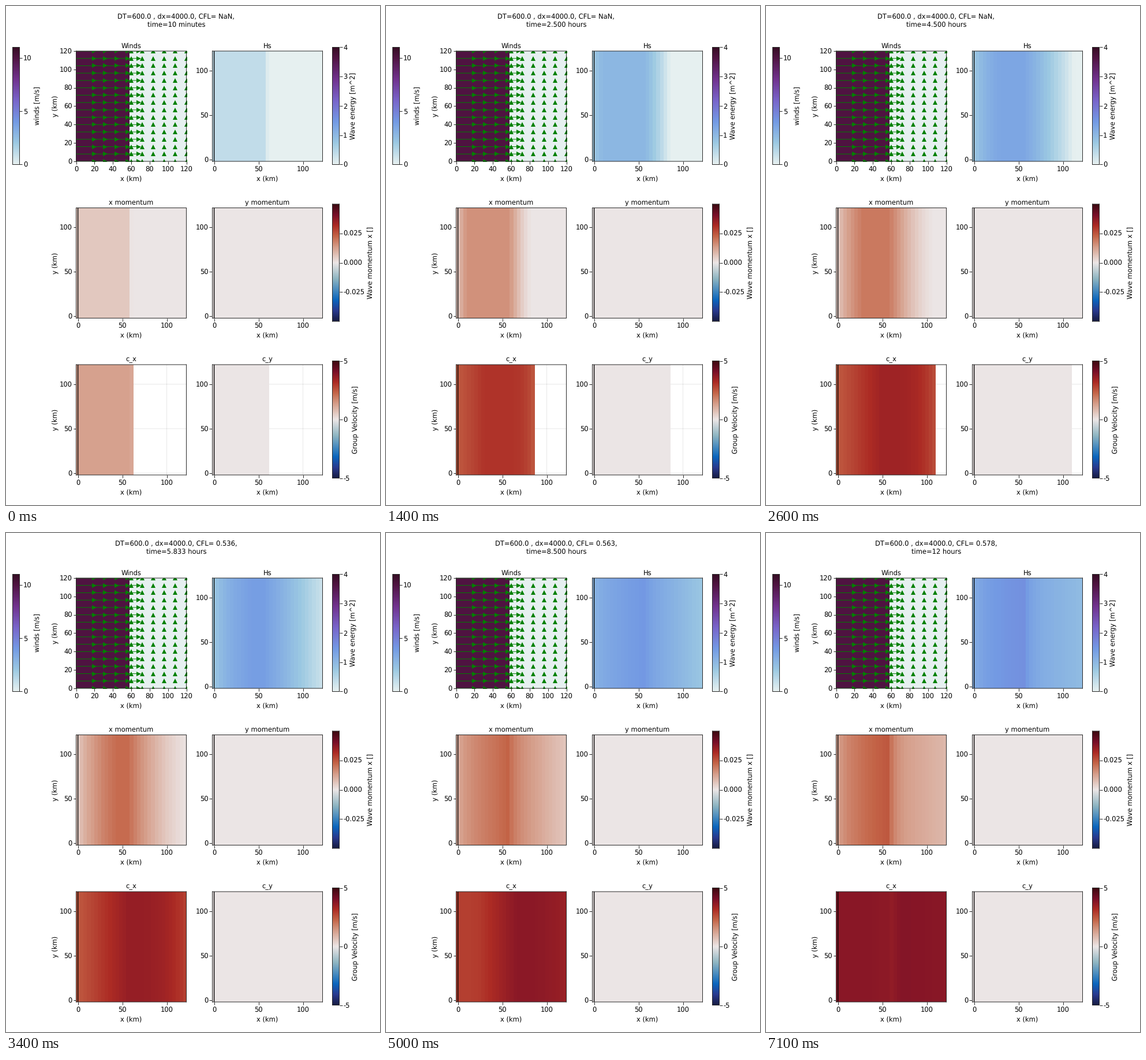
A matplotlib script for the animation above (7200 ms loop, 648 by 864 pixels).

```python
import numpy as np
import matplotlib.pyplot as plt
from matplotlib.animation import FuncAnimation
from matplotlib.colors import LinearSegmentedColormap

W, H, DPI = 648, 864, 72          # at 72 dpi one point is one pixel
FRAMES, INTERVAL = 72, 100
INK = "#2a2a2a"
plt.rcParams.update({
    "font.family": "DejaVu Sans", "font.size": 11.55, "text.hinting": "none",
    "axes.linewidth": 1.0, "axes.edgecolor": INK, "path.snap": False,
})


def make_cmap(name, places, colors):
    stops = [(p / 11, "#" + c) for p, c in zip(places, colors.split())]
    return LinearSegmentedColormap.from_list(name, stops, N=512)


dense = make_cmap("dense", [0, 2, 4, 6, 8, 10, 11],
                  "e6f0f0 9cc9e2 739ae4 7864ca 71328d 501442 360e24")
balance = make_cmap("balance", [0, 1, 2, 4, 5.5, 7, 8, 9, 10, 11],
                    "171c42 293a8f 0b66bd 8eb5c2 ece6e6 "
                    "d59d89 c46548 ac2b24 780e28 3c0911")

X = np.arange(0, 121, 4.0)        # cell centres in km
SPAN = 124                        # the domain is periodic over this length
EDGE = 56                         # last cell under the wind


def swell(x, step):
    """Share of the wave height left after running out of the wind."""
    away = np.maximum(x - EDGE, 0)
    reach = 61 + 1.5 * step + 0.0185 * step ** 2
    u = np.clip(away / (reach - EDGE), 0, 1)
    loss = 0.25 * (step / FRAMES) ** 2
    return (1 - u ** 1.3) * (1 - loss * (1 - np.exp(-away / 8)))


def wave_height(step):
    """Growth limited by time and by fetch, plus swell that wraps around."""
    peak = min(0.36 * (step + 1) ** 0.38, 1.6)
    fetch = 0.537 * (np.minimum(X, EDGE) + 2) ** 0.25
    wrapped = peak * swell(X + SPAN, step)
    windy = np.minimum(np.hypot(fetch, wrapped), peak)
    top = windy[X == EDGE][0]
    return np.where(X <= EDGE, windy, top * swell(X, step)), top


def top_speed(step):
    n = step + 1
    return 3.912 - 1.786 * np.exp(-0.0475 * n) - 1.8 * np.exp(-n / 1.5)


def group_speed(step):
    top = top_speed(step)
    front = 62 + 1.86 * step
    v = np.clip((X - EDGE) / (front - EDGE), 0, 1)
    local = np.minimum(2.45 + 0.02 * X, top * (1 - 0.25 * v ** 3))
    mix = np.clip((step - 44) / 18 - X / 75, 0, 1)
    mix = np.where(X <= EDGE, mix, 0)
    return local + mix * np.maximum(0.98 * top - local, 0)


def elapsed(step):
    minutes = 10 * (step + 1)
    if minutes < 60:
        return f"{minutes} minutes"
    if minutes == 60:
        return "1 hour"
    if minutes % 60 == 0:
        return f"{minutes // 60} hours"
    return f"{minutes / 60:.3f} hours"


fig = plt.figure(figsize=(W / DPI, H / DPI), dpi=DPI, facecolor="white")


def label(x, y, text, **kw):
    """Text centred at a pixel position measured from the top left."""
    kw = {"ha": "center", "va": "baseline", **kw}
    return fig.text(x / W, 1 - y / H, text, **kw)


def side_label(x, y, text):
    label(x, y, text, rotation=90, va="center")


def box(left, top, width, height):
    ax = fig.add_axes([left / W, 1 - (top + height) / H, width / W, height / H])
    ax.tick_params(length=5, width=1, color=INK)
    ax.tick_params(axis="x", pad=3.5)
    ax.tick_params(axis="y", pad=1.5)
    return ax


SIDE = 191


def panel(left, top, title, cmap, vmin, vmax, wind=False):
    ax = box(left, top, SIDE, SIDE)
    lo, hi = (0, 120) if wind else (-2, 122)
    img = ax.imshow(np.zeros((1, X.size)), cmap=cmap, vmin=vmin, vmax=vmax,
                    extent=(-2, 122, -2, 122), aspect="auto",
                    interpolation="nearest", zorder=1)
    ax.set(xlim=(lo, hi), ylim=(lo, hi))
    ticks = range(0, 121, 20 if wind else 50)
    ax.set_xticks(ticks)
    ax.set_yticks(ticks)
    ax.set_axisbelow(True)
    ax.grid(color="black", alpha=0.12, lw=0.8)
    if not wind:
        ax.axvline(0, color="black", lw=1.4, zorder=2)
    mid, bottom = left + SIDE / 2, top + SIDE
    label(mid, top - 5.5, title)
    label(mid, bottom + 33, "x (km)")
    if left < 200:
        side_label(85, top + SIDE / 2, "y (km)")
    return ax, img


def color_bar(left, top, cmap, lo, hi, ticks, form, title, title_x):
    ax = box(left, top, 12, 203)
    ax.imshow(np.linspace(0, 1, 256)[:, None], cmap=cmap, origin="lower",
              extent=(0, 1, lo, hi), aspect="auto")
    ax.set_xticks([])
    ax.yaxis.tick_right()
    ax.set_yticks(ticks, [format(t, form) for t in ticks])
    side_label(title_x, top + 101.5, title)


C1, C2 = 121.5, 357.5
R1, R2, R3 = 78, 349.5, 621
B1, B2, BAR_UP = 11.5, 565.5, 6.5
wind_ax, wind_img = panel(C1, R1, "Winds", dense, 0, 11, wind=True)
_, height_img = panel(C2, R1, "Hs", dense, 0, 4)
_, mx_img = panel(C1, R2, "x momentum", balance, -0.05, 0.05)
panel(C2, R2, "y momentum", balance, -0.05, 0.05)
_, cx_img = panel(C1, R3, "c_x", balance, -5, 5)
_, cy_img = panel(C2, R3, "c_y", balance, -5, 5)

color_bar(B1, R1 - BAR_UP, dense, 0, 11, [0, 5, 10], "d", "winds [m/s]", 54)
color_bar(B2, R1 - BAR_UP, dense, 0, 4, range(5), "d",
          "Wave energy [m^2]", 601)
color_bar(B2, R2 - BAR_UP, balance, -0.05, 0.05, [-0.025, 0, 0.025], ".3f",
          "Wave momentum x []", 631)
color_bar(B2, R3 - BAR_UP, balance, -5, 5, [-5, 0, 5], "d",
          "Group Velocity [m/s]", 605.5)

# Steady wind: long arrows on the left half, calm markers on the right.
wind_img.set_data(np.where(X <= EDGE, 10.0, 0.0)[None, :])
rows = np.arange(0, 121, 8)
wind_ax.hlines(rows, 0, 68, color="green", lw=1, zorder=2)
for cols, mark in ((np.arange(20, 69, 12), ">"), (np.arange(60, 121, 12), "^")):
    gx, gy = np.meshgrid(cols, rows)
    wind_ax.plot(gx.ravel(), gy.ravel(), mark, color="green", ms=8, mew=0,
                 zorder=2.2)

head = label(294.5, 22, "")
clock = label(295, 36, "")


def update(step):
    height, top = wave_height(step)
    momentum = 0.0155 * height ** 2 / top
    wet = 16 + int(0.465 * step)  # cells the waves have reached
    dry = np.arange(X.size) >= wet
    speed = np.ma.array(group_speed(step), mask=dry)
    still = np.ma.array(np.zeros(X.size), mask=dry)
    for img, row in ((height_img, height), (mx_img, momentum),
                     (cx_img, speed), (cy_img, still)):
        img.set_data(row[None, :])
    cfl = "NaN" if dry.any() else f"{top_speed(step) * 600 / 4000:.3f}"
    head.set_text(f"DT=600.0 , dx=4000.0, CFL= {cfl},")
    clock.set_text(f"time={elapsed(step)}")
    return height_img, mx_img, cx_img, cy_img, head, clock


anim = FuncAnimation(fig, update, frames=FRAMES, interval=INTERVAL,
                     repeat=True, repeat_delay=0)
plt.show()
```
